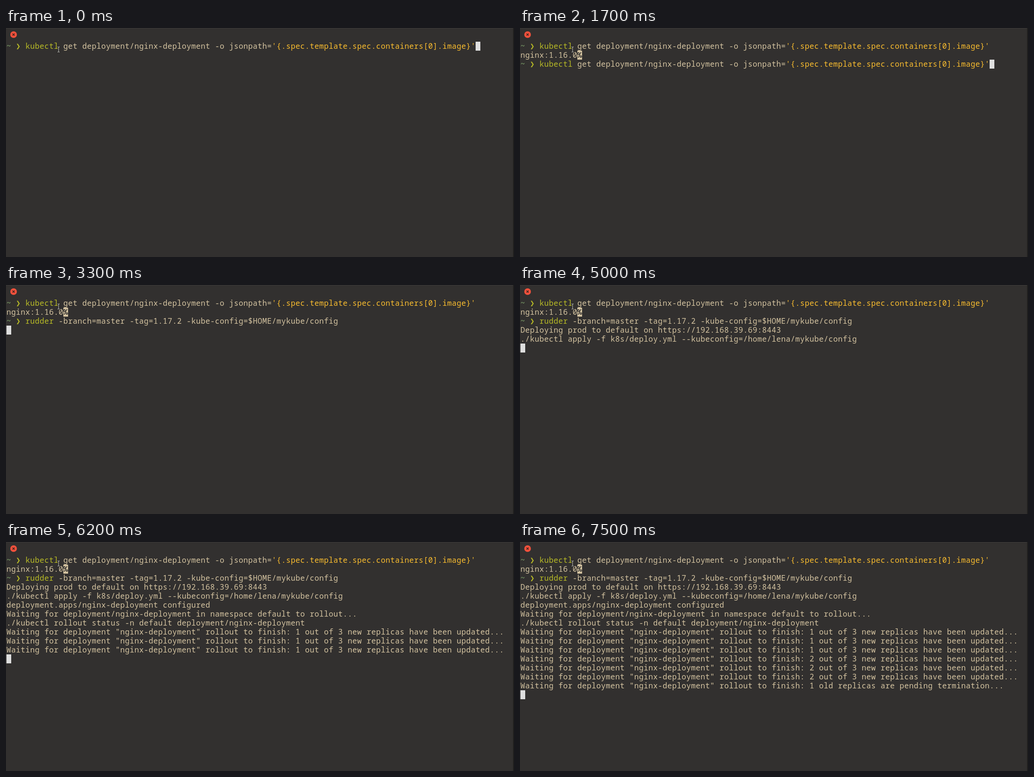
These frames come from a looping animation (1072 px wide and 485 px high, 8000 ms). An HTML page:

```html
<!DOCTYPE html>
<html lang="en">
<head>
<meta charset="utf-8">
<title>Terminal rollout</title>
<style>
  html, body { margin: 0; width: 100%; height: 100%; overflow: hidden; background: #32302f; }
  svg { display: block; width: 1072px; height: 485px; }
  text {
    font: 16px "Noto Sans Mono", "DejaVu Sans Mono", monospace;
    letter-spacing: .4px;
    white-space: pre;
    fill: #d5c4a1;
  }
  .tilde { fill: #83a96f; }
  .arrow { font-family: "DejaVu Sans Mono", monospace; }
  .arrow, .command { fill: #b8bb26; }
  .string { fill: #fabd2f; }
  .inverse { fill: #32302f; font-weight: bold; }
</style>
</head>
<body>
<svg viewBox="0 0 1072 485" xmlns="http://www.w3.org/2000/svg">
  <rect width="1072" height="485" fill="#32302f"/>
  <rect width="1072" height="1" fill="#3c3a38"/>
  <rect x="1070" width="2" height="485" fill="#201f1e"/>
  <circle cx="16" cy="14" r="7" fill="#f2513c"/>
  <path d="M13.7 11.7l4.6 4.6m0-4.6l-4.6 4.6" stroke="#3a2420" stroke-width="1.5"/>
  <g id="screen"></g>
  <g fill="none" stroke-linecap="square">
    <path id="beam" d="M109 40h1.5l.5.5.5-.5h1.5M111 41v9M109 51h1.5l.5-.5.5.5h1.5" stroke="#242322" stroke-width="3"/>
    <use href="#beam"/>
    <path d="M109 40h1.5l.5.5.5-.5h1.5M111 41v9M109 51h1.5l.5-.5.5.5h1.5" stroke="#deded8" stroke-width="1"/>
  </g>
</svg>
<script>
const LOOP = 8000, CELL = 10, ROW = 19, LEFT = 1, TOP = 29, BASELINE = 15;
const screen = document.getElementById('screen');

function add(parent, tag, attrs = {}, content = '') {
  const el = document.createElementNS('http://www.w3.org/2000/svg', tag);
  for (const key in attrs) el.setAttribute(key, attrs[key]);
  el.textContent = content;
  return parent.appendChild(el);
}

const left = col => LEFT + col * CELL;
const top_ = row => TOP + row * ROW;

function block(parent, row, col, fill) {
  add(parent, 'rect', { x: left(col), y: top_(row), width: CELL, height: ROW, fill });
}

function write(parent, row, col, content, style = '') {
  add(parent, 'text', { x: left(col), y: top_(row) + BASELINE, class: style }, content);
}

// A group visible only between two moments of the loop.
function during(from, to = LOOP) {
  const group = add(screen, 'g');
  const key = (time, opacity) => ({ opacity, offset: time / LOOP, easing: 'step-end' });
  group.animate([key(0, 0), key(from, 1), key(to, 0), key(LOOP, 0)],
    { duration: LOOP, iterations: Infinity });
  return group;
}

function prompt(row, from) {
  const group = during(from);
  write(group, row, 0, '~', 'tilde');
  write(group, row, 2, '❯', 'arrow');
}

// Typed command: name in green, options plain, quoted part in yellow.
function command(row, from, to, name, options = '', quoted = '') {
  const group = during(from, to);
  const col = 4 + name.length;
  write(group, row, 4, name, 'command');
  write(group, row, col, options);
  if (quoted) write(group, row, col + options.length, quoted, 'string');
}

const query = ['kubectl', ' get deployment/nginx-deployment -o jsonpath=',
  "'{.spec.template.spec.containers[0].image}'"];
const waiting = 'Waiting for deployment "nginx-deployment" rollout to finish: ';
const updated = n => `${waiting}${n} out of 3 new replicas have been updated...`;

prompt(0, 0);
command(0, 0, LOOP, ...query);

const version = during(900);
write(version, 1, 0, 'nginx:1.16.0');
block(version, 1, 12, '#d5c4a1');
write(version, 1, 12, '%', 'inverse');

prompt(2, 900);
command(2, 1700, 1900, ...query);
command(2, 1900, 2200, 'clear');
command(2, 2200, LOOP, 'rudder', ' -branch=master -tag=1.17.2 -kube-config=$HOME/mykube/config');

// Output lines from row 3 down: [time, text]
[
  [5000, 'Deploying prod to default on https://192.168.39.69:8443'],
  [5000, './kubectl apply -f k8s/deploy.yml --kubeconfig=/home/lena/mykube/config'],
  [5100, 'deployment.apps/nginx-deployment configured'],
  [5100, 'Waiting for deployment/nginx-deployment in namespace default to rollout...'],
  [5100, './kubectl rollout status -n default deployment/nginx-deployment'],
  [5200, updated(1)],
  [6200, updated(1)],
  [6200, updated(1)],
  [6500, updated(2)],
  [7300, updated(2)],
  [7500, updated(2)],
  [7500, waiting + '1 old replicas are pending termination...']
].forEach(([time, line], i) => write(during(time), 3 + i, 0, line));

// Cursor stops: [time, row, column]
[
  [0, 0, 99], [800, 1, 0], [900, 2, 4], [1700, 2, 99], [1900, 2, 9], [2200, 2, 70],
  [3300, 3, 0], [5000, 5, 0], [5100, 8, 0], [5200, 9, 0],
  [6200, 11, 0], [6500, 12, 0], [7300, 13, 0], [7500, 15, 0]
].forEach(([time, row, col], i, stops) => {
  const next = stops[i + 1];
  block(during(time, next ? next[0] : LOOP), row, col, '#dfdfdf');
});
</script>
</body>
</html>
```
